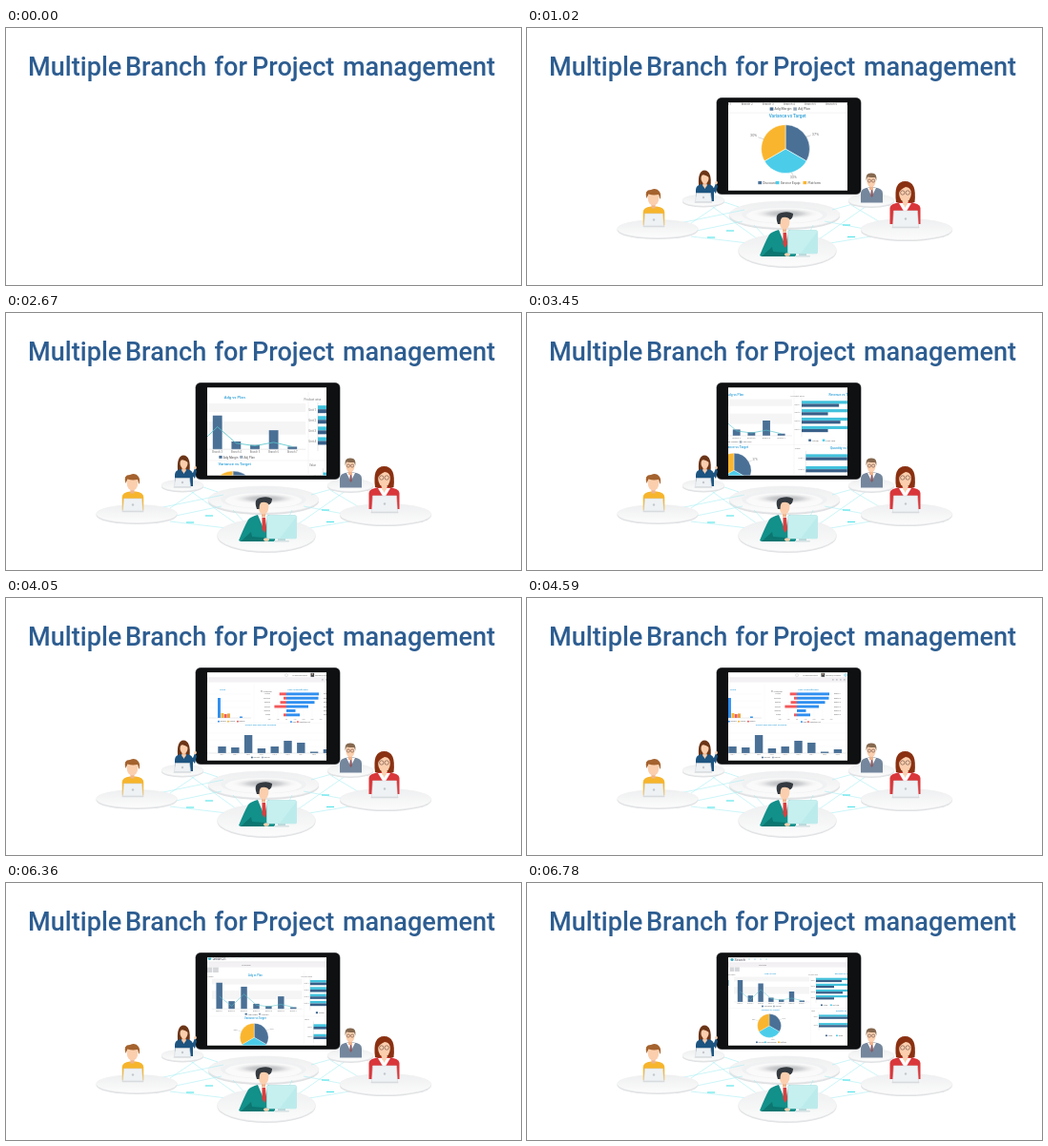
These frames come from a looping animation (540 px wide and 270 px high, 7.11 s). An HTML page:

```html
<!DOCTYPE html>
<html lang="en">
<head>
<meta charset="utf-8">
<title>Multiple Branch for Project management</title>
<style>
html,body{margin:0;width:100%;height:100%;overflow:hidden;background:#fff}
svg{display:block;width:540px;height:270px}
text{font-family:Roboto,sans-serif}
</style>
</head>
<body>
<svg id="stage" viewBox="0 0 540 270" xmlns="http://www.w3.org/2000/svg"></svg>
<script>
const NAVY = '#4a7096', CYAN = '#4bcdea', GOLD = '#fab52e', RED = '#f2595c', BLUE = '#2f8ff0', SKIN = '#fbcfae';
const LOOP = 7110, MOVE = 570, END = 6780, STEP = 30;

const rect = (x, y, w, h, fill, more = '') => `<rect x="${x}" y="${y}" width="${w}" height="${h}" fill="${fill}" ${more}/>`;
const oval = (x, y, rx, ry, fill, more = '') => `<ellipse cx="${x}" cy="${y}" rx="${rx}" ry="${ry}" fill="${fill}" ${more}/>`;
const path = (d, fill, more = '') => `<path d="${d}" fill="${fill}" ${more}/>`;
const line = (d, color, w) => path(d, 'none', `stroke="${color}" stroke-width="${w}"`);
const label = (s, x, y, size = 1.7, fill = '#777', anchor = 'middle', weight = 400) =>
  `<text x="${x}" y="${y}" font-size="${size}" fill="${fill}" text-anchor="${anchor}" font-weight="${weight}">${s}</text>`;
const head = (s, x, y) => label(s, x, y, 2.3, '#2b9fd8', 'middle', 500);
const key = (x, y, color, s) => rect(x, y - 1.5, 1.8, 1.6, color) + label(s, x + 2.4, y, 1.7, '#555', 'start');
const each = (list, fn) => list.map(fn).join('');

function slice(cx, cy, r, from, to, fill) {
  const at = a => `${cx + r * Math.sin(a * Math.PI / 180)} ${cy - r * Math.cos(a * Math.PI / 180)}`;
  return path(`M${cx} ${cy}L${at(from)}A${r} ${r} 0 0 1 ${at(to)}Z`, fill, 'stroke="#fff" stroke-width=".25"');
}

function columns() {
  const x = k => 223.5 + 10.8 * k, base = 125;
  const tall = [23, 6.8, 19.5, 4.5, 2.5, 11, 1.5], plan = [11, 2.5, 13, 3.5, 2, 4, 1.5];
  return rect(217, 98.5, 79, 5, '#f5f5f6') + rect(217, 109, 79, 7.5, '#f5f5f6') +
    each(tall, (h, k) => rect(x(k) - 2.7, base - h, 5.4, h, NAVY) + label('Branch ' + (k + 1), x(k), 127.3, 1.5)) +
    line('M217 125H296', '#ccc', .25) +
    line('M' + plan.map((h, k) => `${x(k)} ${base - h}`).join('L'), '#58c4cb', .45) +
    head('Adg vs Plan', 255, 96) + label('Sales Margin', 214, 97.4, 1.5) +
    key(246, 130.2, NAVY, 'Adg Margin') + key(258, 130.2, '#9ab', 'Adj Plan');
}

function pie() {
  const x = 254, y = 150, r = 12.4;
  return head('Variance vs Target', 255, 134) +
    slice(x, y, r, 0, 120, NAVY) + slice(x, y, r, 120, 240, CYAN) + slice(x, y, r, 240, 360, GOLD) +
    line('M264 144l3-1M257 162l1 1.6M243 145l-3-1', '#999', .2) +
    label('37%', 269.3, 143, 1.9) + label('33%', 258, 165.2, 1.9) + label('30%', 237.7, 143.6, 1.9) +
    key(240, 168, NAVY, 'Discount') + key(249, 168, CYAN, 'Service Equip') + key(263, 168, GOLD, 'Platform');
}

function pairs(x, y, navy, gap) {
  return each(navy, (w, k) => rect(x, y + k * gap, 43, 2.2, '#42c2dc') +
    rect(x, y + k * gap + 2.2, w, 2.2, '#385f88') + label('Unit ' + (k + 1), x - 1, y + k * gap + 3, 1.7, '#777', 'end'));
}

function bar(x) {
  return rect(x, 76, 240, 8, '#fff') + rect(x, 83.7, 240, 4.8, '#f3f1f4') + line(`M${x} 83.7h240`, '#d5d3d6', .3);
}

function salesPage() {
  return rect(150, 70, 260, 130, '#fff') + bar(180) +
    oval(215, 80.5, 1.6, 1.6, '#3aaec0') + label('Search', 217.5, 81.8, 3.8, '#556', 'start') +
    each([232, 238, 244, 250], x => rect(x, 79, 2, 2, '#d8eef1')) +
    label('Overview', 247, 87.1, 2, '#777') +
    rect(212.5, 88.500, 4.8, 4.5, '#d5d7da') + rect(218, 88.500, 4.8, 4.5, '#d5d7da') + rect(211.2, 102, .6, 6, '#65acd0') +
    columns() + pie() +
    label('Product wise', 300, 97, 1.7) + head('Revenue vs Target', 332, 96) +
    line('M303 98V126', '#bbb', .2) + pairs(303, 99.7, [27, 19, 28, 19], 6.1) +
    key(308, 129, '#385f88', 'Actual') + key(318, 129, CYAN, 'Last Year') +
    label('Value', 300, 135, 1.6) + head('Quantity vs Plan', 332, 134.5) +
    line('M306 136V155', '#bbb', .2) + pairs(306, 138.4, [30, 30], 8.7) +
    key(313, 161, '#385f88', 'Actual') + key(324, 161, CYAN, 'Target') +
    line('M297.5 92V170M211 131.5H360', '#eee', .3);
}

function costPage() {
  const red = [7.3, 3, 6.5, 12.6, 0, 3], blue = [34, 33.5, 29.5, 23, 9.5, 14];
  const tall = [7, 6, 19, 5, 7, 13, 11, 1.5, 4];
  const names = ['Central', 'Northern', 'Eastern', 'Support', 'Western', 'Online'];
  return rect(120, 70, 300, 130, '#fff') + bar(150) +
    oval(283, 81, 1.5, 1.5, 'none', 'stroke="#bbb" stroke-width=".4"') + label('All branches report', 297, 81.8, 1.9, '#555') +
    rect(308.5, 78.6, 3.6, 4.2, '#3f4145') + oval(310.3, 80, .8, 1, '#b9a48e') +
    label('Welcome, Manager', 321, 81.8, 1.9, '#555') + oval(334, 81, 1.3, 1.3, 'none', 'stroke="#39b6d4" stroke-width=".5"') +
    each([320, 324, 328, 332], x => rect(x, 85, 1.6, 1.6, '#c5c7ca')) +
    head('Cost vs Benefit Ratio', 295, 97) + key(256, 98.6, '#bbb', 'All branches') +
    line('M265 99V126M274 99V126M292 99V126M301 99V126M310 99V126M319 99V126', '#eee', .2) +
    each(red, (w, k) => {
      const y = 99.4 + 4.4 * k;
      return rect(283 - w, y, w, 2.9, RED) + rect(283, y, blue[k], 2.9, BLUE) +
        label(names[k], 266, y + 2, 1.8, '#666', 'end') + label('Region ' + (k + 1), 322, y + 2, 1.8, '#666', 'start');
    }) +
    each([-20, -10, 0, 10, 20, 30, 40], v => label(v + 'K', 283 + v * .9, 128, 1.6)) +
    key(287, 130.8, BLUE, 'Sales') + key(294, 130.8, RED, 'Marketing Cost') +
    head('Trend', 216, 97) + each([101, 108, 115], y => line(`M180 ${y}H246`, '#eee', .3)) +
    each([[185, 9, NAVY], [190, 4, GOLD], [211, 21, BLUE], [214.5, 5, GOLD], [217.7, 4, RED], [221, 4.6, '#e8a23c'], [234, 1.5, BLUE]],
      b => rect(b[0], 126 - b[1], 2.9, b[1], b[2])) + line('M180 126H246', '#bbb', .3) +
    key(211, 130.4, BLUE, 'Opening') + key(221, 130.4, GOLD, 'Closing') + key(231, 130.4, RED, 'Balance') +
    line('M249 91V131M150 131.3H345', '#eee', .3) +
    head('Project wise Discount Overview', 256, 134.3) +
    each([142, 149, 156], y => line(`M180 ${y}H336`, '#eee', .3)) +
    each(tall, (h, k) => rect(211.3 + 13.8 * k, 163 - h, 8.4, h, NAVY) + label('Plan ' + (k + 1), 215.5 + 13.8 * k, 165.2, 1.5)) +
    line('M180 163H336', '#bbb', .3) + key(246, 168.2, NAVY, 'Discount') + key(257, 168.2, '#9ab', 'Planned');
}

const disc = (x, y, rx, ry, d = 1.5) => oval(x, y + d, rx, ry, '#dfe1e3') + oval(x, y, rx, ry, 'url(#disc)', 'stroke="#ececee" stroke-width=".5"');

function laptop(x, y, w, h) {
  return path(`M${x - w / 2 + 1} ${y}H${x + w / 2 - 1}L${x + w / 2} ${y + h}H${x - w / 2}Z`, '#eff2f4', 'stroke="#d3d7da" stroke-width=".6"') +
    oval(x, y + h / 2, 1.2, 1.2, '#c3c8cd') + rect(x - w / 2 - 1, y + h, w + 2, 1.2, '#d8dbde', 'rx=".6"');
}
const torso = (x, y, w, h, fill) =>
  path(`M${x - w / 2} ${y + h}V${y + 6}Q${x - w / 2} ${y + 1} ${x - 3} ${y}H${x + 3}Q${x + w / 2} ${y + 1} ${x + w / 2} ${y + 6}V${y + h}Z`, fill);
const face = (x, y, rx, ry) => rect(x - 2, y + ry - 2, 4, 5, '#f0b48e') + oval(x, y, rx, ry, SKIN);
const glasses = (x, y, r) => each([-1, 1], s => `<circle cx="${x + s * (r + .5)}" cy="${y}" r="${r}" fill="none" stroke="#6b4a40" stroke-width=".6"/>`);

function backWoman() {
  return path('M180 165Q179 150 186 149.500Q194 150 192.500 166L189 168H183Z', '#6b3517') +
    torso(186.5, 164, 19, 18, '#1d5480') + path('M193 168L198 174L200 166L198 163L196 168Z', '#1d5480') + oval(198.5, 162.5, 1.3, 1.8, SKIN) +
    face(186.5, 158, 4, 5.4) + path('M181.500 158Q183 151 191 157Q190 150 186 151Q181.500 152 181.500 158Z', '#6b3517') +
    path('M184 164.500L186.500 169L189 164.500Z', SKIN) + laptop(185, 173.5, 17, 9);
}
function backMan() {
  return torso(361.5, 167.5, 23, 16, '#74879d') + path('M357 168L361.500 177L366 168Z', '#fff') +
    path('M360.800 170H362.400L363 176L361.500 178L360.200 176Z', '#8e5a60') +
    face(361, 160.5, 4.6, 6.6) + path('M355.700 160.500Q354.500 152 361 152.500Q367.500 152 366.300 160.500L365 157Q361 157 357 156.500Z', '#85684f') + glasses(361, 160.5, 1.6);
}
function leftMan() {
  return torso(133, 187.500, 22.500, 20, '#f6b52c') + face(132.5, 178.500, 5.8, 8) +
    path('M125.500 179Q122.500 170 130 170Q136 167.500 139 172Q141 175 139.500 180L138 175Q132 176 127.500 174.500Z', '#a4622e') + laptop(133, 195, 21, 13);
}
function rightWoman() {
  return path('M387 183Q384 161 396.500 161Q409 161 406.500 183Q397 187 387 183Z', '#8a3112') +
    torso(396.500, 183, 32, 23, '#d9373b') + path('M390 184L396.500 195L403 184Z', '#fff') +
    face(396.500, 174, 6.3, 8.8) + path('M393.500 182L396.500 189L400 182Z', SKIN) +
    path('M389 174Q389 163 397 163Q405 163 404.500 174Q402 167 397 167Q392 169 389 174Z', '#8a3112') + glasses(396.500, 173, 2.2) +
    laptop(397, 192, 27, 17);
}
function frontMan() {
  return path('M244 239Q250 224 254 217Q257 214 264 212H275Q281 215 282 224V240H246Z', '#12908a') +
    path('M264 212L271 229L275 212Z', '#fff') + path('M268.500 215H272L273 227L271 231L268.500 227Z', '#d8403f') +
    face(270, 203.500, 5.4, 8) +
    path('M263 206Q259 195 267 194Q274 192 279 195Q279 200 275.500 201.500Q274 198 268 199Q265.500 200 265.500 206Z', '#343a40') +
    path('M257 230L258 235L271 236V240H246Z', '#0c7670') + oval(273, 238, 3, 1.8, SKIN) +
    rect(273.500, 212.5, 31, 24.5, '#c6f0f0', 'rx="1.5" stroke="#b2e3e5" stroke-width=".6"') + path('M304.500 214V236.500H287Z', '#bcebec') +
    rect(285, 237, 8, 2.5, '#b9dadd') + rect(281, 239, 16, 1.4, '#d4e0e2', 'rx=".7"');
}

function links() {
  const ends = [[160, 205, 228, 191], [178, 213, 226, 203], [192, 186, 245, 224], [204, 182, 222, 188], [172, 219, 232, 226],
    [172, 205, 200, 186], [320, 191, 345, 184], [312, 203, 354, 211], [356, 187, 306, 222], [318, 226, 366, 218], [340, 186, 372, 205], [238, 207, 252, 222], [300, 207, 294, 220]];
  return each(ends, ([a, b, c, d]) => line(`M${a} ${b}L${c} ${d}`, '#a9eff3', .6)) +
    each([[193, 220], [340, 219.500], [213, 213], [335, 207]], ([x, y]) => line(`M${x - 4} ${y}h8`, '#4fe3ea', 1.1));
}

function platform() {
  return disc(270, 196, 58, 14, 2) + oval(270, 196, 45, 9.500, '#f0f1f2') + oval(270, 197, 40, 8, '#fafafa') + oval(271, 195, 36, 6, 'url(#shade)');
}

function tablet() {
  return rect(198.5, 73, 152, 102, '#6c6f73', 'rx="5.5"') + rect(199, 73.6, 151, 100.8, '#0f1011', 'rx="5"') +
    rect(211, 78.5, 125, 92, '#fff') +
    `<g clip-path="url(#screen)"><g id="sales">${salesPage()}</g><g id="cost">${costPage()}</g></g>`;
}

const title = `<text y="50" font-size="27.1" font-weight="500" fill="#2d5d91">
  <tspan x="23">Multiple</tspan> <tspan x="125">Branch</tspan> <tspan x="218.500">for</tspan> <tspan x="258">Project</tspan> <tspan x="353">management</tspan></text>`;

document.getElementById('stage').innerHTML =
  `<defs><clipPath id="screen"><rect x="211" y="78.500" width="125" height="92"/></clipPath>
  <linearGradient id="disc" x1="0" y1="0" x2="0" y2="1"><stop stop-color="#eeeff0"/><stop offset="1" stop-color="#fcfcfc"/></linearGradient>
  <radialGradient id="shade"><stop stop-color="#a9abae"/><stop offset=".5" stop-color="#d4d5d7"/><stop offset="1" stop-color="#fafafa" stop-opacity="0"/></radialGradient></defs>` +
  rect(0, 0, 540, 270, '#fff') + title +
  '<g id="scene">' + platform() + links() + disc(185, 181, 22, 6) + disc(361, 181, 24, 6.5) + disc(137, 211, 42.5, 9.5) + disc(398, 211.5, 48, 11) +
  disc(273, 233.5, 51.5, 17) + tablet() + backWoman() + backMan() + leftMan() + rightWoman() + frontMan() + '</g>';

const scene = document.getElementById('scene');
const pages = [document.getElementById('sales'), document.getElementById('cost')];

// Camera stops: time, page, zoom, centre x, centre y
const stops = [
  [MOVE, 0, 1, 273.5, 124],
  [990, 0, 2.05, 255.2, 148.5],
  [1350, 0, 2.05, 255.2, 148.5],
  [2040, 0, 2.01, 250.4, 113.1],
  [2340, 0, 2.01, 250.4, 113.1],
  [3030, 0, 1.6, 300, 116],
  [3450, 0, 1.45, 293, 121.6],
  [3960, 0, 1, 273.5, 124],
  [3990, 1, 1, 262, 124],
  [4470, 1, 1, 273.5, 124],
  [4740, 1, 1, 273.5, 124],
  [5580, 1, 1.35, 291.5, 110.4],
  [5910, 1, 1.35, 291.5, 110.4],
  [6300, 1, 1, 273.5, 124],
  [6330, 0, 1.2, 265, 118],
  [END, 0, 1, 273.5, 124]
];

function camera(t) {
  const i = stops.findIndex(s => s[0] > t);
  if (i === 0) return stops[0];
  if (i < 0) return stops[stops.length - 1];
  const a = stops[i - 1], b = stops[i];
  if (a[1] !== b[1]) return a;
  const u = (t - a[0]) / (b[0] - a[0]), e = u * u * (3 - 2 * u);
  return a.map((v, k) => v + (b[k] - v) * e);
}

function draw(ms) {
  const t = ms % LOOP;
  scene.style.display = t < 100 ? 'none' : '';
  const [, page, z, x, y] = camera(Math.floor(t / STEP) * STEP);
  pages.forEach((g, i) => g.style.display = i === page ? '' : 'none');
  pages[page].setAttribute('transform', `translate(${273.5 - z * x} ${124 - z * y}) scale(${z})`);
}

const start = performance.now();
function tick() {
  draw(performance.now() - start);
  requestAnimationFrame(tick);
}
draw(0);
tick();
</script>
</body>
</html>
```
